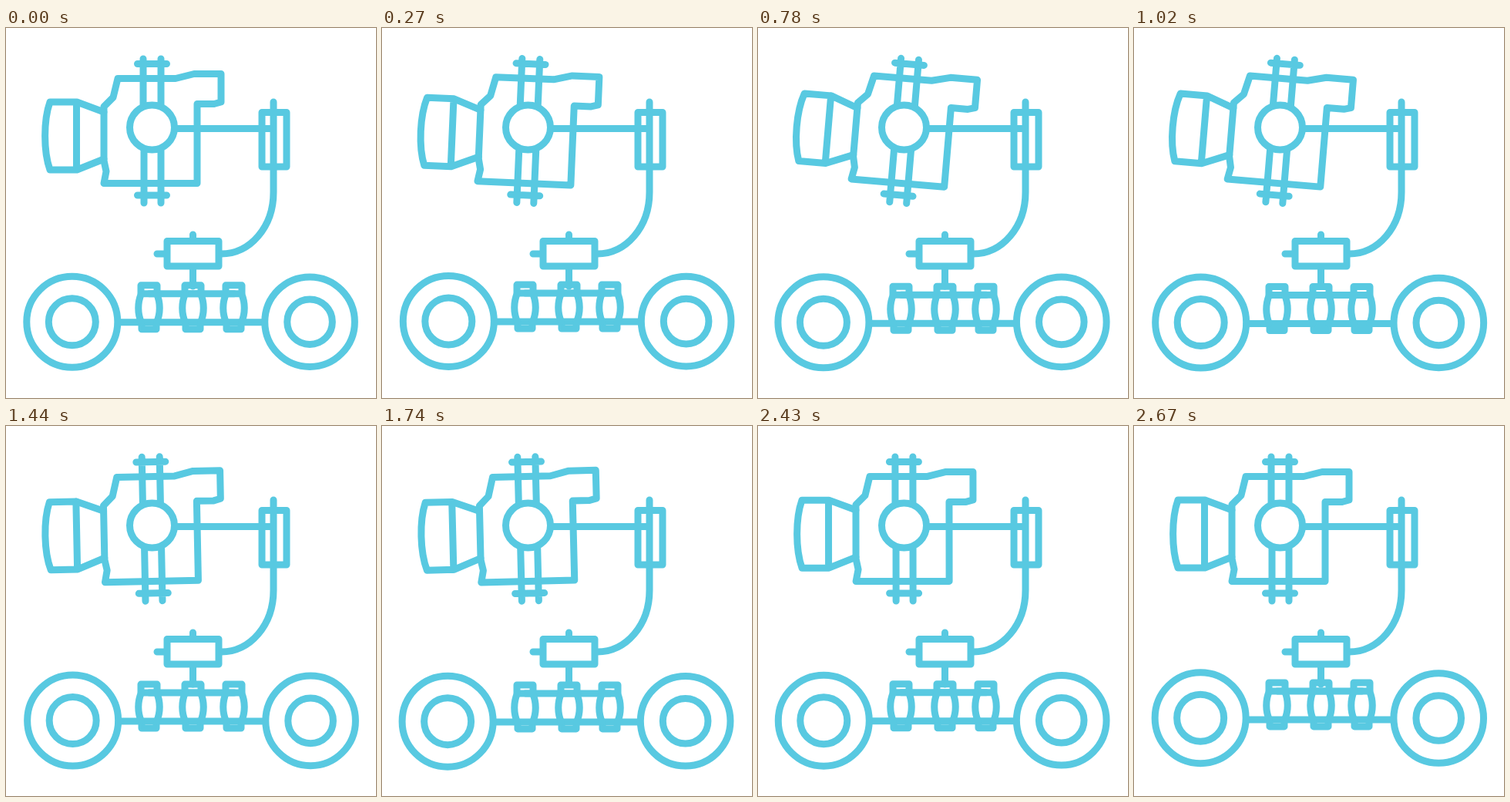
Animation, 480 px wide and 480 px high, one loop 2.7 s. Source, as an HTML page:

```html
<!DOCTYPE html>
<html lang="en">
<head>
<meta charset="utf-8">
<title>Camera dolly</title>
<style>
  html, body { margin: 0; height: 100%; overflow: hidden; background: #fff; }
  svg { display: block; width: 100%; height: 100%; }
  svg { fill: none; stroke: #58c9e1; stroke-width: 9; stroke-linecap: round; stroke-linejoin: round; }
</style>
</head>
<body>
<svg viewBox="0 0 480 480">
  <defs>
    <g id="clamp">
      <path d="M-10.5 345.5V334.5H10.5V345.5ZM-9.5 382.5V391.5H9.5V382.5"/>
      <path d="M-10 345.5C-15 357 -15 371 -10 382.5M10 345.5C15 357 15 371 10 382.5"/>
    </g>
  </defs>

  <g id="camera">
    <path d="M145 65.5H220L244 59.5H279V96L270 98.5H248V201.5H127L130 186L127 172V102L139 90Z"/>
    <path d="M127 109L92 96H57C48.500 120 48.500 160 57 184H92L127 170M91.500 96V184"/>
    <path d="M178 40V101M201 40V101M170.500 46.500H208.500M179 158V227M201 158V227M170.500 217H208.500"/>
  </g>

  <circle cx="189.500" cy="129" r="29"/>
  <path d="M219 130.500H347M332 109.500H364V180H332ZM347 96V213C347 258 317 293 279 293"/>
  <path d="M209 276.500H276V309H209ZM242.500 268V276M196 293H209M242.500 309V335"/>

  <g id="chassis">
    <path d="M146 382.500H334M186 345.500H296"/>
    <use href="#clamp" x="185.500"/>
    <use href="#clamp" x="242.500"/>
    <use href="#clamp" x="295.500"/>
  </g>
  <g id="left"><circle r="59"/><circle r="30.500"/></g>
  <g id="right"><circle r="58.300"/><circle r="29.300"/></g>
</svg>
<script>
  const LOOP = 2700, STEP = 30, TAU = Math.PI * 2;
  const tilts = [[0, 0], [540, 4.9], [1000, 4.8], [1500, -1.4], [2000, -1.4], [2500, 0], [LOOP, 0]];
  const el = id => document.getElementById(id);
  const move = (id, x, y) => el(id).setAttribute('transform', `translate(${x} ${y})`);

  function tiltAt(t) {
    const i = tilts.findIndex(([end]) => t < end);
    const [t0, a] = tilts[i - 1], [t1, b] = tilts[i];
    const p = (t - t0) / (t1 - t0);
    return a + (b - a) * p * p * (3 - 2 * p);
  }

  // Each wheel runs slightly off centre while following the chassis.
  function placeWheel(id, x, y, turn) {
    move(id, x + 0.9 * Math.cos(turn * TAU), y + 0.9 * Math.sin(turn * TAU));
  }

  function draw(t) {
    const phase = t / LOOP;
    const bounce = 1.6 * Math.cos((19 * phase - 0.32) * TAU);
    el('camera').setAttribute('transform', `rotate(${tiltAt(t)} 189.5 129)`);
    move('chassis', 0, bounce);
    placeWheel('left', 85.8, 381.1 + bounce, 39 * phase - 0.75);
    placeWheel('right', 394.5, 381.1 + bounce, 39 * phase - 0.67);
  }

  const start = performance.now();
  function tick() {
    const t = (performance.now() - start) % LOOP;
    draw(Math.floor(t / STEP) * STEP);
    requestAnimationFrame(tick);
  }
  tick();
</script>
</body>
</html>
```
